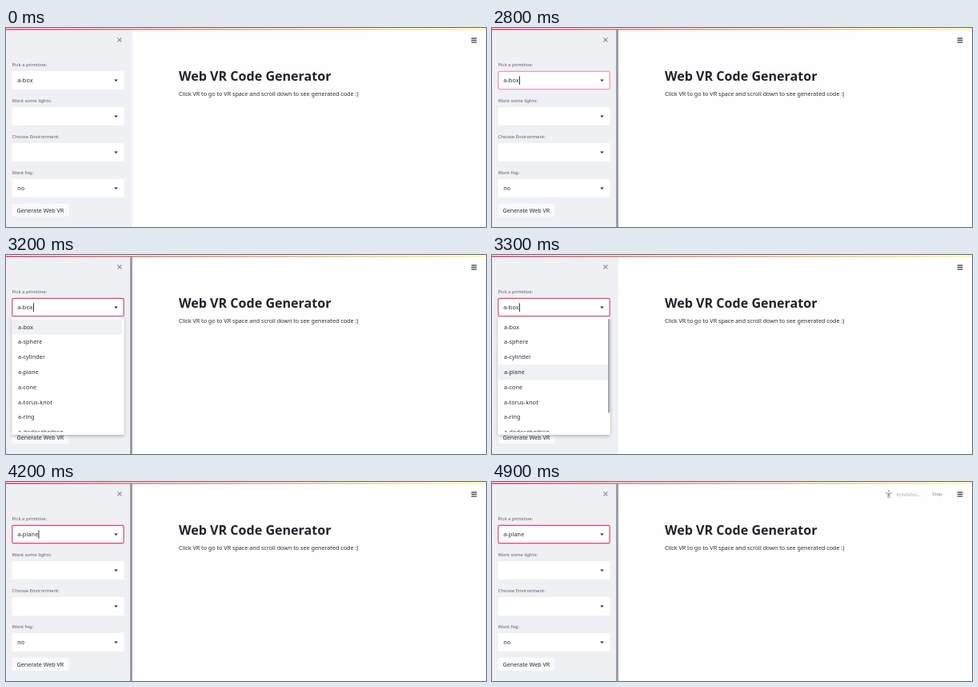
An HTML page that plays this animation: 600x249 px, repeating every 5 s.

```html
<!DOCTYPE html>
<html lang="en">
<head>
<meta charset="utf-8">
<title>Web VR Code Generator</title>
<style>
  html, body { margin: 0; width: 100%; height: 100%; overflow: hidden; background: #fefefe; }
  svg { display: block; width: 100vw; height: 100vh; }
  text { font-family: "Noto Sans", "Open Sans", sans-serif; font-size: 7.2px; fill: #2b2c35; white-space: pre; }
  .title { font-size: 16.08px; font-weight: 700; fill: #22232c; }
  .label { font-size: 5.9px; fill: #5b5d68; }
  .value { letter-spacing: .15px; }
  .item { letter-spacing: .1px; }
  .status { font-size: 5.7px; fill: #a9abb4; }
  .stop { font-size: 5.9px; fill: #7b7d88; }
</style>
</head>
<body>
<svg id="stage" viewBox="0 0 600 249" preserveAspectRatio="none">
  <defs>
    <linearGradient id="rainbow">
      <stop offset="0" stop-color="#f63366"/>
      <stop offset="1" stop-color="#fffd80"/>
    </linearGradient>
    <filter id="shadow" x="-10%" y="-10%" width="120%" height="125%">
      <feDropShadow dx="0" dy="1.6" stdDeviation="2" flood-color="#000" flood-opacity=".28"/>
    </filter>
    <clipPath id="listClip"><rect x="7.5" y="77" width="140" height="144.6"/></clipPath>
  </defs>
  <rect width="600" height="249" fill="#fefefe"/>
  <rect y="1" width="158" height="248" fill="#eef0f4"/>
  <rect id="bar" x="155" y="1" width="3" height="248" fill="#9b9da9"/>
  <rect y="0" width="600" height="1" fill="#fefefe"/>
  <rect y="1" width="600" height="1.5" fill="url(#rainbow)"/>
  <path d="M139.4 12.4l5 5m0-5l-5 5" stroke="#8e909b" stroke-width="1.3"/>
  <path d="M581.6 12.9h6.8m-6.8 2.5h6.8m-6.8 2.5h6.8" stroke="#3a3b45" stroke-width="1.1"/>

  <text class="title" x="216" y="66">Web VR Code Generator</text>
  <text x="216" y="85.4">Click VR to go to VR space and scroll down to see generated code :)</text>

  <g id="form"></g>
  <rect x="7.5" y="220" width="71" height="16" rx="1.5" fill="#f9fafb"/>
  <text x="13.5" y="230.5">Generate Web VR</text>

  <rect id="focus" x="7.8" y="54.3" width="139.4" height="22.4" rx="1.8" fill="none" stroke="#ee3f6f"/>
  <rect id="caret" y="60.2" width="1" height="10.6" fill="#33343d"/>

  <g id="menu">
    <rect x="7.5" y="77.2" width="140" height="147.8" rx="1.8" fill="#fff" filter="url(#shadow)"/>
    <rect id="hover" x="8" width="137" height="18.8" fill="#eff1f5"/>
    <g id="list" clip-path="url(#listClip)"></g>
    <rect id="scroll" x="145" y="80" width="2.4" height="117.5" rx="1" fill="#a6a7ad"/>
  </g>

  <g id="running">
    <g fill="none" stroke="#9c9ea8" stroke-width="1.3" stroke-linecap="round">
      <circle cx="496" cy="11.3" r="1.1" fill="#9c9ea8" stroke="none"/>
      <path d="M492.3 13.6l2.6.6h2.2l2.6-.6M495.1 14.4v5.2m1.8-5.2v5.2m-1.8-3.2h1.8m-1.8-1.2h1.8" stroke-width="1.1"/>
    </g>
    <text class="status" x="505.4" y="17.6">RUNNING...</text>
    <text class="stop" x="550.2" y="17.2">Stop</text>
  </g>
</svg>
<script>
const $ = id => document.getElementById(id);
const NS = "http://www.w3.org/2000/svg";

function add(parent, tag, attrs, text = "") {
  const el = document.createElementNS(NS, tag);
  for (const k in attrs) el.setAttribute(k, attrs[k]);
  el.textContent = text;
  return parent.appendChild(el);
}

const LOOP = 5000, STEP = 100;
const ROW = 18.8, LIST_TOP = 80.8;

const fields = [
  ["Pick a primitive:", "a-box"],
  ["Want some lights:", ""],
  ["Choose Environment:", ""],
  ["Want fog:", "no"]
];
const shapes = ["box", "sphere", "cylinder", "plane", "cone", "torus-knot", "ring", "dodecahedron"];

const values = fields.map(([label, value], i) => {
  const y = 54 + i * 45;
  const form = $("form");
  add(form, "text", { class: "label", x: 7.5, y: y - 6 }, label);
  add(form, "rect", { x: 7.5, y, width: 140, height: 23, rx: 1.8, fill: "#fff" });
  add(form, "path", { d: `M135.2 ${y + 10.4}h4.6l-2.3 2.5z`, fill: "#2b2c35" });
  return add(form, "text", { class: "value", x: 14.2, y: y + 14 }, value);
});
shapes.forEach((name, i) =>
  add($("list"), "text", { class: "item", x: 15, y: LIST_TOP + i * ROW + 11.7 }, "a-" + name));

const show = (id, on) => $(id).setAttribute("visibility", on ? "visible" : "hidden");
const fade = (id, a) => $(id).setAttribute("opacity", Math.max(0, Math.min(1, a)));

function render(time) {
  const t = Math.floor((time % LOOP) / STEP) * STEP;
  const within = (a, b) => t >= a && t < b;
  const picked = t >= 4200;
  const browsing = within(3300, 4200);

  show("bar", t >= 1000 && !browsing);
  values[0].textContent = picked ? "a-plane" : "a-box";

  show("focus", t >= 2800);
  $("focus").setAttribute("stroke-width", t < 2900 ? 0.8 : 1.2);
  fade("focus", t < 2900 ? 0.85 : 1);

  show("caret", within(2800, 3400) || within(4200, 4700));
  $("caret").setAttribute("x", picked ? 40.4 : 34);

  const open = within(2900, 4200);
  $("menu").setAttribute("display", open ? "inline" : "none");
  fade("menu", (t - 2800) / 300);
  $("hover").setAttribute("y", LIST_TOP + (browsing ? 3 : 0) * ROW);
  show("scroll", browsing);

  $("running").setAttribute("display", t >= 4700 ? "inline" : "none");
  fade("running", (t - 4600) / 300);
}

function tick() {
  render(performance.now());
  requestAnimationFrame(tick);
}
tick();
</script>
</body>
</html>
```
